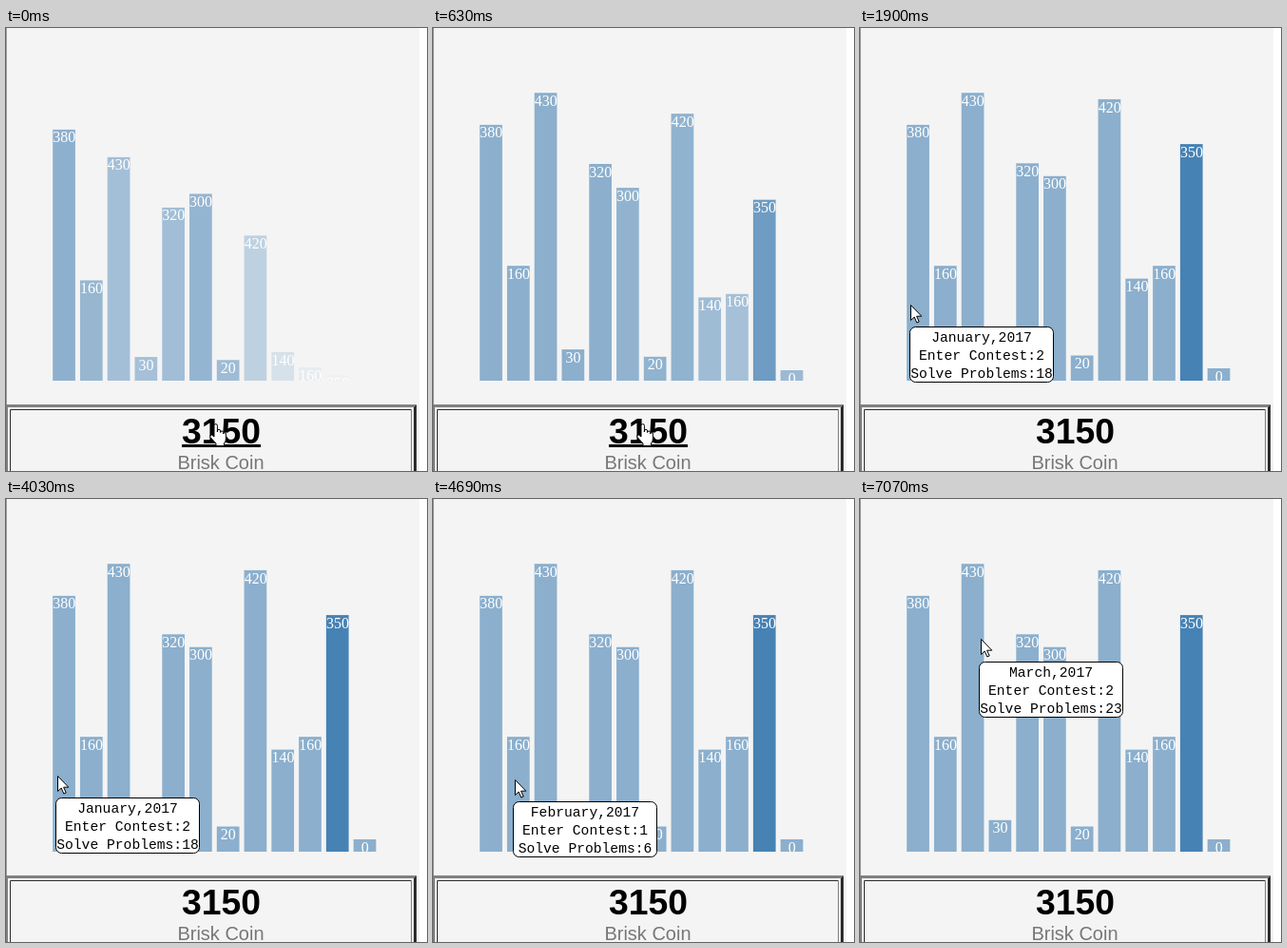
Write an HTML page that moves like this. It is 443 px wide and 466 px high and loops after 8000 ms.

```html
<!DOCTYPE html>
<html lang="en">
<head>
<meta charset="utf-8">
<title>Monthly coins</title>
<style>
  html, body { margin: 0; width: 100%; height: 100%; overflow: hidden; background: #fff; }
  svg { display: block; }
  text { text-anchor: middle; }
  .label { font: 16px "Liberation Serif", serif; fill: #fff; }
  .total { font: bold 37.33px "Liberation Sans", Arial, sans-serif; }
  .unit { font: 20px "Liberation Sans", Arial, sans-serif; fill: #777; }
  .tip text { font: 14.67px "Liberation Mono", monospace; }
  .cursor { fill: #fff; stroke: #000; stroke-linejoin: round; }
</style>
</head>
<body>
<svg width="443" height="466" viewBox="0 0 443 466">
  <clipPath id="plot"><rect width="443" height="371"/></clipPath>
  <rect width="435" height="466" fill="#f4f4f4"/>
  <rect width="1" height="396" fill="#a0a0a0"/>
  <g id="bars" clip-path="url(#plot)"></g>

  <path d="M0 396H432L429 399H2V466H0Z" fill="#808080"/>
  <path d="M432 396V466H429V399Z" fill="#2c2c2c"/>
  <path d="M4.5 466V401.5H426.5" fill="none" stroke="#2c2c2c"/>
  <path d="M426.5 401V466" stroke="#808080"/>
  <text class="total" x="226.5" y="436.500">3150</text>
  <rect id="underline" x="185" y="438" width="83" height="3"/>
  <text class="unit" x="226" y="463.500">Brisk Coin</text>

  <g id="tip" class="tip">
    <rect x=".5" y=".5" width="151" height="58" rx="6" fill="#fff" stroke="#000"/>
    <text x="76" y="16"></text>
    <text x="76" y="35"></text>
    <text x="76" y="54"></text>
  </g>
  <path id="arrow" class="cursor" d="M.5 .5V16.5L4.2 13L6.8 19L9.2 18L6.6 12.2H11.8Z"/>
  <path id="hand" class="cursor" d="M5 14V2.3a1.7 1.7 0 0 1 3.4 0V9V8a1.6 1.6 0 0 1 3.2 0V9.5a1.5 1.5 0 0 1 3 0V11a1.4 1.4 0 0 1 2.8 0V16Q17.400 19 15.500 21V23.500H7V21L1 14.500Q0 12 2.500 12Z"/>
</svg>
<script>
const LOOP = 8000, BASE = 371, BAR_W = 23.7;
const VALUES = [380, 160, 430, 30, 320, 300, 20, 420, 140, 160, 350, 0];
const CURRENT = 10;
const MONTHS = [['January', 2, 18], ['February', 1, 6], ['March', 2, 23]];

const smooth = u => u * u * (3 - 2 * u);
const easeOut = u => 1 - (1 - u) ** 3;

// each stroke is a quadratic curve: start, control, end
const REST = [[214, 416], [53.6, 291], [86.4, 295], [127, 147.6]];
const STROKES = [
  { from: 930, to: 1900, ease: smooth, path: [REST[0], [100, 385], REST[1]] },
  { from: 3960, to: 4690, ease: smooth, path: [REST[1], [70, 293], REST[2]] },
  { from: 6290, to: 7070, ease: easeOut, path: [REST[2], [142, 140], REST[3]] }
];

const $ = id => document.getElementById(id);
const tipLines = $('tip').querySelectorAll('text');
const place = (el, x, y) => el.setAttribute('transform', `translate(${x} ${y})`);
const show = (el, on) => el.setAttribute('visibility', on ? 'visible' : 'hidden');

function add(parent, tag, attrs) {
  const el = document.createElementNS('http://www.w3.org/2000/svg', tag);
  for (const key in attrs) el.setAttribute(key, attrs[key]);
  return parent.appendChild(el);
}

const bars = VALUES.map((value, i) => {
  const x = 49.2 + 28.77 * i;
  const rect = add($('bars'), 'rect', { x, width: BAR_W, fill: '#4682b4' });
  const label = add($('bars'), 'text', { x: x + BAR_W / 2 + 0.2, class: 'label' });
  label.textContent = value;
  return { x, rect, label, full: 13 + 0.674 * value, alpha: i === CURRENT ? 1 : 0.6 };
});

function bounce(u) {
  if (u <= 0) return 0;
  if (u >= 1) return 1;
  const k = 7.5625;
  if (u < 4 / 11) return k * u * u;
  if (u < 8 / 11) return k * (u - 6 / 11) ** 2 + 0.75;
  if (u < 10 / 11) return k * (u - 9 / 11) ** 2 + 0.9375;
  return k * (u - 10.5 / 11) ** 2 + 0.984375;
}

// the bars redraw in steps of 133 ms
const redrawTime = t => Math.max(0, Math.floor((t + 40) / 133) * 133 - 40);

function drawBars(t) {
  bars.forEach(({ rect, label, full, alpha }, i) => {
    const grow = bounce(0.742 - 0.0687 * i + t / 1400);
    const h = full * grow;
    rect.setAttribute('y', BASE - h);
    rect.setAttribute('height', h);
    rect.setAttribute('fill-opacity', alpha * grow);
    label.setAttribute('y', BASE - h + 13.6);
  });
}

function pointerAt(t) {
  const { from, to, ease, path: [a, b, c] } = STROKES.findLast(s => s.from <= t) || STROKES[0];
  const s = ease(Math.min(1, Math.max(0, (t - from) / (to - from))));
  return [0, 1].map(k => (1 - s) ** 2 * a[k] + 2 * s * (1 - s) * b[k] + s * s * c[k]);
}

function drawTip(x, y) {
  const hit = bars.findIndex(b => x >= b.x && x <= b.x + BAR_W && y >= BASE - b.full && y <= BASE);
  const month = MONTHS[hit];
  show($('tip'), month);
  if (!month) return;
  const [name, contests, solved] = month;
  place($('tip'), Math.floor(x - 1.5), Math.round(y + 23));
  [`${name},2017`, `Enter Contest:${contests}`, `Solve Problems:${solved}`]
    .forEach((line, i) => { tipLines[i].textContent = line; });
}

function drawPointer(t) {
  const [x, y] = pointerAt(t);
  const overLink = x > 185;
  show($('hand'), overLink);
  show($('arrow'), !overLink);
  show($('underline'), y > 400);
  place(overLink ? $('hand') : $('arrow'), Math.floor(x), Math.floor(y));
  drawTip(x, y);
}

const start = performance.now();
function frame() {
  const t = (performance.now() - start) % LOOP;
  drawBars(redrawTime(t));
  drawPointer(t);
  requestAnimationFrame(frame);
}
frame();
</script>
</body>
</html>
```
